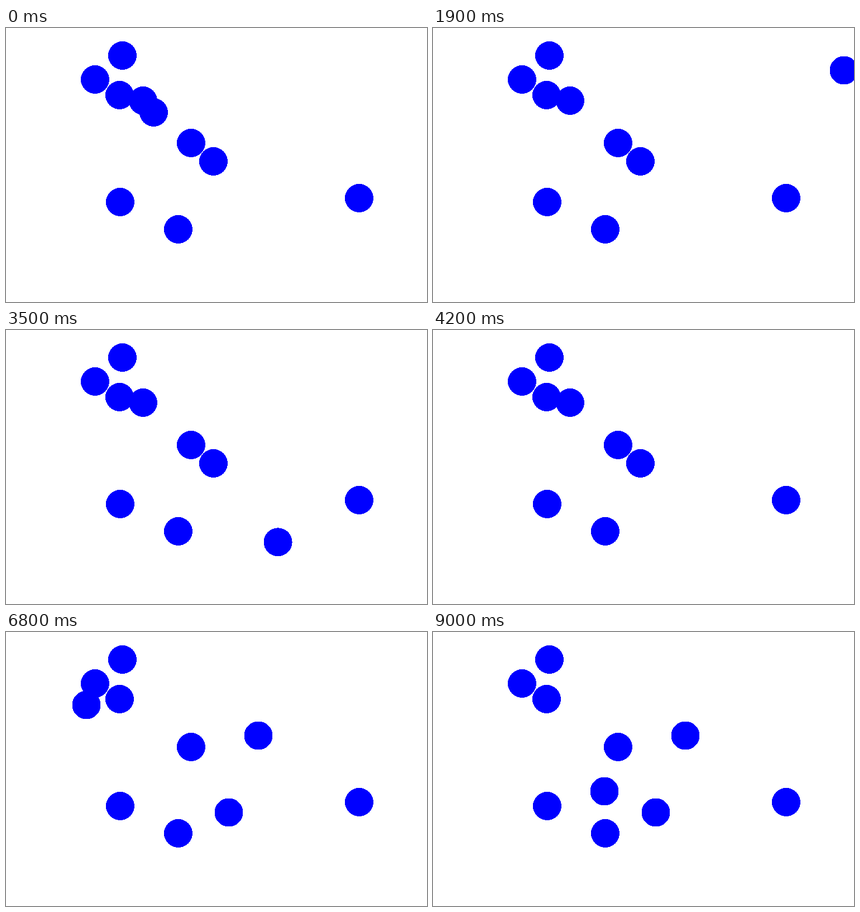
Animation, 754 px wide and 492 px high, one loop 9100 ms. Source, as an HTML page:

```html
<!DOCTYPE html>
<html lang="en">
<head>
<meta charset="utf-8">
<title>Dragged circles</title>
<style>
  html, body { margin: 0; width: 100%; height: 100%; overflow: hidden; background: #fff; }
  svg { display: block; width: 754px; height: 492px; }
  circle { fill: #00f; shape-rendering: crispEdges; }
</style>
</head>
<body>
<svg id="stage" viewBox="0 0 754 492"></svg>
<script>
const LOOP = 9100, STEP = 100, RADIUS = 25.5;

const resting = [
  [208.5, 49.5], [159.5, 92.5], [203.5, 120.5], [331.5, 206.5],
  [204.5, 312.5], [308.5, 361.5], [632.5, 305.5]
];

// A few turning points per drag: [step, x, y]
const drags = [
  [[63, 245.5, 130.5], [68, 144, 131], [74, 150, 260], [81, 490, 48],
   [84, 645, 180], [87, 475, 355], [90, 307, 286]],
  [[58, 371.5, 239.5], [63, 399, 324]],
  [[0, 264.5, 151.5], [7, 447, -34], [14, 742, -30], [19, 736, 76],
   [28, 519, 141], [34, 460, 360], [41, 758, 420], [48, 795, 160],
   [54, 457, 132], [58, 452, 186]]
];

const stage = document.getElementById("stage");

function place(c, [x, y]) {
  c.setAttribute("cx", x);
  c.setAttribute("cy", y);
}

function addCircle(point) {
  const c = document.createElementNS("http://www.w3.org/2000/svg", "circle");
  c.setAttribute("r", RADIUS);
  place(c, point);
  return stage.appendChild(c);
}

// Slope of one coordinate at a key, flat at both ends
function slope(keys, i, axis) {
  const a = keys[i - 1], b = keys[i + 1];
  return a && b ? (b[axis] - a[axis]) / (b[0] - a[0]) : 0;
}

// Smooth curve through the keys, at rest before and after
function sample(keys, s) {
  const first = keys[0], last = keys[keys.length - 1];
  if (s <= first[0]) return first.slice(1);
  if (s >= last[0]) return last.slice(1);
  const i = keys.findIndex(k => k[0] > s) - 1;
  const a = keys[i], b = keys[i + 1];
  const span = b[0] - a[0], u = (s - a[0]) / span, v = 1 - u;
  return [1, 2].map(n =>
    a[n] + (b[n] - a[n]) * u * u * (3 - 2 * u)
    + span * u * v * (v * slope(keys, i, n) - u * slope(keys, i + 1, n)));
}

resting.forEach(addCircle);
const movers = drags.map(keys => addCircle(keys[0].slice(1)));

function draw() {
  const s = Math.floor(performance.now() % LOOP / STEP);
  movers.forEach((c, i) => place(c, sample(drags[i], s)));
  requestAnimationFrame(draw);
}
draw();
</script>
</body>
</html>
```
